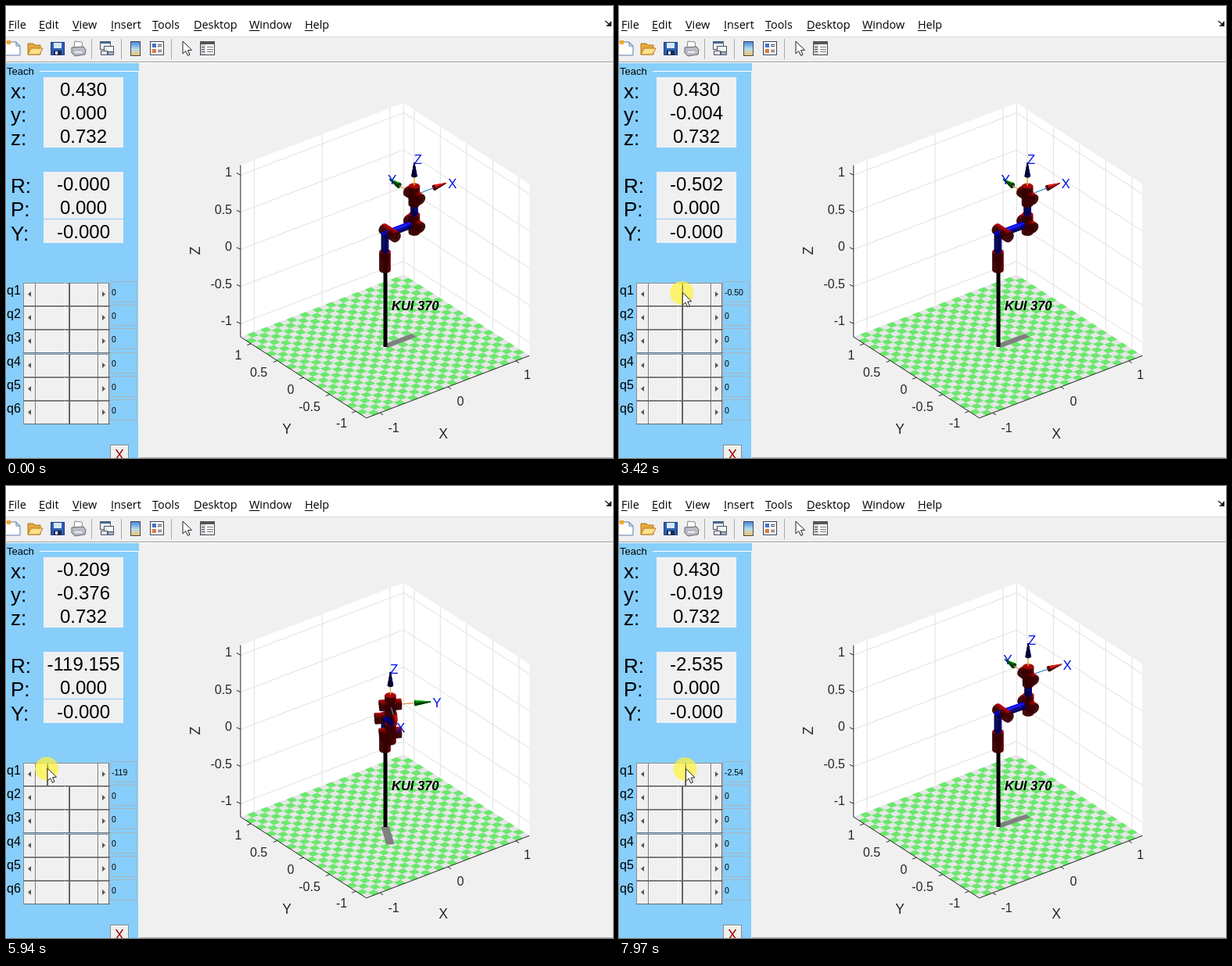
Recreate the animation shown at these times as an HTML page with a canvas. Size 776x578 px, loop 8 s.

```html
<!DOCTYPE html>
<html>
<head>
<meta charset="utf-8">
<style>
html, body { margin: 0; width: 100%; height: 100%; overflow: hidden; background: #f0f0f0; }
canvas { display: block; }
</style>
</head>
<body>
<canvas id="stage" width="776" height="578"></canvas>
<script>
const LOOP = 8000;
const ARIAL = '"Liberation Sans", Arial, sans-serif';
const stage = document.getElementById('stage').getContext('2d');
const backdrop = document.createElement('canvas');
backdrop.width = 776;
backdrop.height = 578;
let g = backdrop.getContext('2d');

// Drawing helpers
function rect(x, y, w, h, fill, stroke) {
  if (fill) { g.fillStyle = fill; g.fillRect(x, y, w, h); }
  if (stroke) { g.strokeStyle = stroke; g.lineWidth = 1; g.strokeRect(x + .5, y + .5, w - 1, h - 1); }
}
function poly(pts, fill, stroke, width = 1, close = true) {
  g.beginPath();
  pts.forEach(p => g.lineTo(p[0], p[1]));
  if (close) g.closePath();
  if (fill) { g.fillStyle = fill; g.fill(); }
  if (stroke) { g.strokeStyle = stroke; g.lineWidth = width; g.stroke(); }
}
const line = (a, b, color, width = 1) => poly([a, b], null, color, width, false);
function text(str, x, y, font, color = '#000', align = 'left', base = 'alphabetic') {
  g.font = font;
  g.fillStyle = color;
  g.textAlign = align;
  g.textBaseline = base;
  g.fillText(str, x, y);
}
const arial = (px, style = '') => `${style} ${px}px ${ARIAL}`;

// Vectors and the orthographic view (azimuth -37.5, elevation 30)
const add = (a, b, k = 1) => a.map((v, i) => v + b[i] * k);
const dot = (a, b) => a[0] * b[0] + a[1] * b[1] + a[2] * b[2];
const cross = (a, b) => [a[1] * b[2] - a[2] * b[1], a[2] * b[0] - a[0] * b[2], a[0] * b[1] - a[1] * b[0]];
const unit = a => { const l = Math.hypot(...a); return a.map(v => v / l); };
const VIEW = [-.527, -.687, .5], LIGHT = unit([1, 0, 1]);
const project = ([x, y, z]) => [484.5 + 87 * x - 66.9 * y, 326 - 33.4 * x - 43.4 * y - 95 * z];
const floor = (x, y, up = 0) => [484.5 + 86.9 * x - 67 * y, 435.2 - 33.2 * x - 43.2 * y - up];

function drawMenu() {
  rect(0, 0, 776, 578, '#f0f0f0');
  rect(0, 0, 776, 39, '#fff');
  rect(0, 39, 776, 1, '#dcdcdc');
  rect(0, 71, 776, 1, '#a0a0a0');
  rect(0, 72, 776, 1, '#fff');
  rect(170, 577, 606, 1, '#b4b4b4');
  const font = '14.4px "Open Sans", "Noto Sans", sans-serif';
  [['File', 3], ['Edit', 42], ['View', 85], ['Insert', 134], ['Tools', 187], ['Desktop', 240],
    ['Window', 311], ['Help', 382]].forEach(([word, x]) => {
    text(word, x, 29, font);
    rect(x, 31, g.measureText(word[0]).width, 1, '#000');
  });
  line([766, 19], [773, 25], '#222', 1.5);
  poly([[774, 19], [774, 26], [767, 26]], '#222');
}

function drawToolbar() {
  const edge = '#556';
  [109, 147, 211].forEach(x => rect(x, 42, 1, 26, '#aaa'));
  poly([[-4, 46], [13, 46], [18, 51], [18, 63], [-4, 63]], '#fff', '#5b7ca5');
  poly([[13, 46], [13, 51], [18, 51]], '#d5e4f5', '#5b7ca5');
  rect(1, 44, 5, 5, '#f5a623');
  poly([[28, 62], [28, 48], [35, 48], [37, 50], [44, 50], [44, 62]], '#e7a83c', '#b27a1e');
  poly([[28, 62], [32, 54], [47, 54], [43, 62]], '#ffe08a', '#b27a1e');
  rect(57, 46, 18, 17, '#2f5fb0', '#1d3d7a');
  rect(61, 47, 10, 7, '#d8e8fb');
  rect(61, 57, 10, 6, '#152a55');
  rect(63, 58, 3, 4, '#eee');
  poly([[87, 53], [88, 45], [97, 46], [98, 53]], '#fff', '#888');
  poly([[84, 53], [99, 52], [102, 56], [101, 62], [88, 64], [84, 60]], '#b9bcc4', '#666');
  rect(88, 58, 9, 2, '#eee');
  rect(120, 45, 14, 11, '#eaf2fb', edge);
  rect(120, 45, 14, 3, '#47648c');
  rect(125, 51, 13, 9, '#f8f8f8', edge);
  rect(121, 57, 9, 6, '#dfe6ee', edge);
  rect(130, 58, 8, 5, '#9db3cb', edge);
  const bar = g.createLinearGradient(0, 46, 0, 64);
  bar.addColorStop(0, '#4a86dc');
  bar.addColorStop(.5, '#b5dbee');
  bar.addColorStop(1, '#f7c456');
  rect(159, 45, 13, 19, bar, '#445');
  rect(184, 45, 18, 18, '#fff', '#445');
  rect(187, 48, 5, 5, '#3c74d0');
  rect(187, 55, 5, 5, '#e0793a');
  [49, 51, 56, 58].forEach(y => rect(194, y, 5, 1, '#445'));
  pointer(226, 45);
  rect(248, 45, 19, 18, '#fff', '#444');
  rect(248, 45, 19, 4, '#555');
  rect(249, 49, 6, 13, '#cfd6de');
  [52, 55, 58].forEach(y => { rect(250, y, 4, 1, '#555'); rect(257, y, 8, 1, '#777'); });
}

function pointer(x, y) {
  const shape = [[0, 0], [0, 16], [3.7, 12.6], [6.4, 18.4], [9, 17.2], [6.5, 11.7], [11.5, 11.3]];
  poly(shape.map(p => [p[0] + x, p[1] + y]), '#fff', '#222');
}

function drawPanel() {
  rect(0, 73, 170, 505, '#87cefa');
  rect(43, 83, 127, 1, '#fff');
  rect(169, 83, 1, 495, '#f0f0f0');
  text('Teach', 1, 88, arial(13));
  'xyzRPY'.split('').forEach((c, i) => text(c + ':', 6, (i < 3 ? 118 : 148.5) + 30.2 * i, arial(26)));
  rect(48, 91, 102, 90, '#f0f0f0');
  rect(48, 212, 102, 91, '#f0f0f0');
  rect(48, 272, 102, 1, '#87cefa');
  for (let i = 0; i < 6; i++) {
    const y = Math.round(354 + 30.2 * i);
    text('q' + (i + 1), 1, y + 15, arial(16));
    rect(22, y, 110, 30, '#f0f0f0', '#8c8c8c');
    rect(23, y + 1, 108, 1, '#fff');
    rect(22, y + 29, 111, 1, '#696969');
    rect(131, y, 1, 30, '#696969');
    [37, 117].forEach(x => { rect(x, y, 1, 29, '#777'); rect(x + 1, y + 1, 1, 28, '#fff'); });
    poly([[32, y + 11], [32, y + 18], [28, y + 14.5]], '#555');
    poly([[123, y + 11], [123, y + 18], [127, y + 14.5]], '#555');
    rect(133, y - 2, 34, 27, null, '#a9b4bd');
    if (i) {
      thumb(81, y);
      text('0', 135, y + 16, arial(10.5));
    }
  }
  rect(133, 561, 24, 18, '#f0f0f0', '#8a8a8a');
  rect(134, 562, 22, 1, '#fff');
  text('X', 145, 580, arial(18), '#a00000', 'center');
}

function thumb(x, y) {
  rect(x - 6, y, 1, 29, '#fff');
  rect(x - 1, y, 1, 29, '#777');
  rect(x, y, 1, 29, '#555');
}

function drawAxes() {
  const E = 1.2, TOP = 219.5, ticks = [-1, -.5, 0, .5, 1];
  const corner = (x, y, up) => floor(x * E, y * E, up);
  poly([corner(-1, 1), corner(-1, 1, TOP), corner(1, 1, TOP), corner(1, -1, TOP), corner(1, -1), corner(1, 1)], '#fff');
  const grid = '#e0e0e0', ink = '#262626';
  [-1, 0, 1].forEach(x => line(floor(x, E), floor(x, E, TOP), grid));
  ticks.forEach(v => {
    line(floor(E, v), floor(E, v, TOP), grid);
    const up = 112 + 95 * v;
    poly([corner(-1, 1, up), corner(1, 1, up), corner(1, -1, up)], null, grid, 1, false);
  });
  line(corner(1, 1), corner(1, 1, TOP), grid);
  poly([corner(-1, -1), corner(1, -1), corner(1, 1), corner(-1, 1)], '#e6e6e6');
  const TILES = 25, w = 2 * E / TILES;
  for (let i = 0; i < TILES; i++) for (let j = 0; j < TILES; j++) if ((i + j) % 2) {
    const x = i * w - E, y = j * w - E;
    poly([floor(x, y), floor(x + w, y), floor(x + w, y + w), floor(x, y + w)], '#6be86e');
  }
  poly([corner(-1, 1, TOP), corner(-1, 1), corner(-1, -1), corner(1, -1)], null, ink, 1, false);
  const label = (s, x, y, align = 'center') => text(s, x, y, arial(16), ink, align, 'middle');
  ticks.forEach((v, i) => {
    const [zx, zy] = corner(-1, 1, 112 + 95 * v);
    line([zx, zy], [zx - 5, zy - 2.5], ink);
    label(v, 289, 309 - 95 * v, 'right');
    const [yx, yy] = floor(-E, v);
    line([yx, yy], [yx - 5, yy + 2], ink);
    label(v, [429, 388, 364, 323, 297][i], 491.5 - 43.5 * v);
    if (i % 2 === 0) {
      const [xx, xy] = floor(v, -E);
      line([xx, xy], [xx + 4, xy + 2.6], ink);
      label(v, 581 + 85.5 * v, 507 - 34 * v);
    }
  });
  text('X', 559, 548, arial(17.5), ink, 'center', 'middle');
  text('Y', 359, 542, arial(17.5), ink, 'center', 'middle');
  g.save();
  g.translate(243, 313);
  g.rotate(-Math.PI / 2);
  text('Z', 0, 0, arial(17.5), ink, 'center', 'middle');
  g.restore();
}

// Robot: small shaded facets painted from far to near
let facets = [];
function shade(rgb, n) {
  const nl = Math.max(0, dot(n, LIGHT));
  const shine = nl && .2 * Math.max(0, 2 * nl * dot(n, VIEW) - dot(LIGHT, VIEW)) ** 10;
  return `rgb(${rgb.map(c => Math.min(255, 255 * (c * (.32 + .85 * nl) + shine)) | 0)})`;
}
function facet(pts, fill) {
  const mid = pts.reduce((s, p) => add(s, p, 1 / pts.length), [0, 0, 0]);
  facets.push({ pts: pts.map(project), fill, depth: dot(mid, VIEW) });
}
function tube(a, b, r0, r1, rgb) {
  const SIDES = 22, axis = add(b, a, -1), u = unit(axis);
  const v = unit(cross(u, Math.abs(u[2]) < .9 ? [0, 0, 1] : [1, 0, 0])), w = cross(u, v);
  const segs = Math.ceil(Math.hypot(...axis) / .04);
  const dir = q => add(v.map(c => c * Math.cos(q)), w, Math.sin(q));
  const at = (k, q) => add(add(a, axis, k), dir(q), r0 + (r1 - r0) * k);
  const front = dot(u, VIEW) > 0, end = front ? 1 : 0;
  const capColor = shade(rgb, u.map(c => front ? c : -c));
  for (let i = 0; i < SIDES; i++) {
    const q0 = i / SIDES * 2 * Math.PI, q1 = (i + 1) / SIDES * 2 * Math.PI;
    const n = unit(add(dir((q0 + q1) / 2), u, (r0 - r1) / Math.hypot(...axis)));
    if (dot(n, VIEW) > 0) for (let j = 0; j < segs; j++) {
      const k0 = j / segs, k1 = (j + 1) / segs;
      facet([at(k0, q0), at(k1, q0), at(k1, q1), at(k0, q1)], shade(rgb, n));
    }
    facet([at(end, q0), at(end, q1), add(a, axis, end)], capColor);
  }
}

function drawRobot(deg) {
  const th = deg * Math.PI / 180, c = Math.cos(th), s = Math.sin(th);
  const X = [c, s, 0], Y = [-s, c, 0], Z = [0, 0, 1];
  const at = (r, z) => [r * c, r * s, z];
  const tool = at(.43, .732), RED = [.7, 0, 0], BLUE = [0, 0, 1];
  poly([[0, 1], [.43, 1], [.43, -1], [0, -1]].map(([r, k]) =>
    floor(r * c - .047 * k * s, r * s + .047 * k * c)), '#808080');
  line([485, 436], [485, 330], '#000', 5);
  text('KUI 370', 493, 389, arial(16.5, 'italic bold'));

  facets = [];
  const joint = (p, dir) => tube(add(p, dir, -.125), add(p, dir, .125), .063, .063, RED);
  const link = (p, q) => tube(p, q, .04, .04, BLUE);
  link(at(0, 0), at(0, .37));
  link(at(0, .352), at(.43, .352));
  link(at(.43, .352), tool);
  joint(at(0, 0), Z);
  joint(at(.07, .352), Y);
  joint(at(.43, .352), Y);
  joint(at(.43, .352), Z);
  joint(tool, Y);
  joint(tool, Z);
  const arrows = [[X, .47, [.8, 0, 0], '#3c8fd0'], [Y, .47, [0, .7, 0], '#d9a05a'], [Z, .44, [0, 0, .6], '#edb120']];
  arrows.forEach(([dir, len, rgb, color]) => {
    tube(add(tool, dir, len - .18), add(tool, dir, len), .031, 0, rgb);
    for (let k = 0; k < 5; k++) {
      const from = add(tool, dir, k * .06), to = add(tool, dir, k * .06 + .06);
      facet([from, to], color);
    }
  });
  facets.sort((a, b) => a.depth - b.depth).forEach(f =>
    poly(f.pts, f.pts.length > 2 && f.fill, f.fill, f.pts.length > 2 ? .5 : 1));
  [X, Y, Z].forEach((dir, i) => {
    const [x, y] = project(add(tool, dir, .5));
    text('XYZ'[i], x - .5, y + 3, arial(17), '#0014e0', 'left', 'middle');
  });
}

// Piecewise linear motion over [time, value] pairs
function track(t, keys) {
  const i = keys.findIndex(k => k[0] > t);
  if (i === 0) return keys[0][1];
  if (i < 0) return keys[keys.length - 1][1];
  const [t0, v0] = keys[i - 1], [t1, v1] = keys[i];
  return v0 + (v1 - v0) * (t - t0) / (t1 - t0);
}
const ANGLE = [[3410, 0], [3910, -22.817], [4190, -58], [4460, -78.592], [4800, -107], [5150, -107],
  [5330, -119.155], [6000, -119.155], [6730, -109.014], [6800, -109.014], [7200, -88], [7570, -48], [7770, -2.535]];
const HAND = [[3410, 81], [3910, 71], [4190, 66], [4460, 62.5], [4800, 57], [5150, 57],
  [5330, 52.5], [6000, 52.5], [6730, 63.5], [7570, 74], [7770, 83], [7970, 85]];
const bezier = (a, b, c, d, k) =>
  a * (1 - k) ** 3 + 3 * b * k * (1 - k) ** 2 + 3 * c * k * k * (1 - k) + d * k ** 3;

function draw(t) {
  g = stage;
  g.drawImage(backdrop, 0, 0);
  const deg = track(t, ANGLE), th = deg * Math.PI / 180, pressed = t >= 2020;
  drawRobot(deg);

  const value = (s, y) => text(s, 99, y, arial(24), '#000', 'center');
  value((.43 * Math.cos(th)).toFixed(3), 115);
  value((.43 * Math.sin(th)).toFixed(3), 145);
  value('0.732', 175);
  value(pressed ? deg.toFixed(3) : '-0.000', 236);
  value('0.000', 266);
  value('-0.000', 297);
  const entry = !pressed ? '0' : deg === 0 ? '2.54e-' : deg.toPrecision(3).slice(0, 5);
  text(entry, 135, 370, arial(10.5));

  const hand = track(t, HAND);
  thumb(Math.round(hand), 354);
  if (t < 520) return;
  const k = Math.min(1, (t - 460) / 830);
  const x = pressed ? hand : bezier(654, 600, 150, 80, k);
  const y = pressed ? track(t, [[3410, 366], [3910, 361], [4460, 360], [7970, 361]]) : bezier(578, -80, 60, 366, k);
  if (pressed) {
    g.fillStyle = 'rgba(255, 242, 60, .72)';
    g.beginPath();
    g.arc(x - .5, y + 1, 15, 0, 7);
    g.fill();
    rect(Math.round(hand), 357, 1, 20, 'rgba(80, 80, 60, .6)');
  }
  pointer(x + .5, y + .5);
}

drawMenu();
drawToolbar();
drawPanel();
drawAxes();
function tick() {
  draw(performance.now() % LOOP);
  requestAnimationFrame(tick);
}
tick();
</script>
</body>
</html>
```
